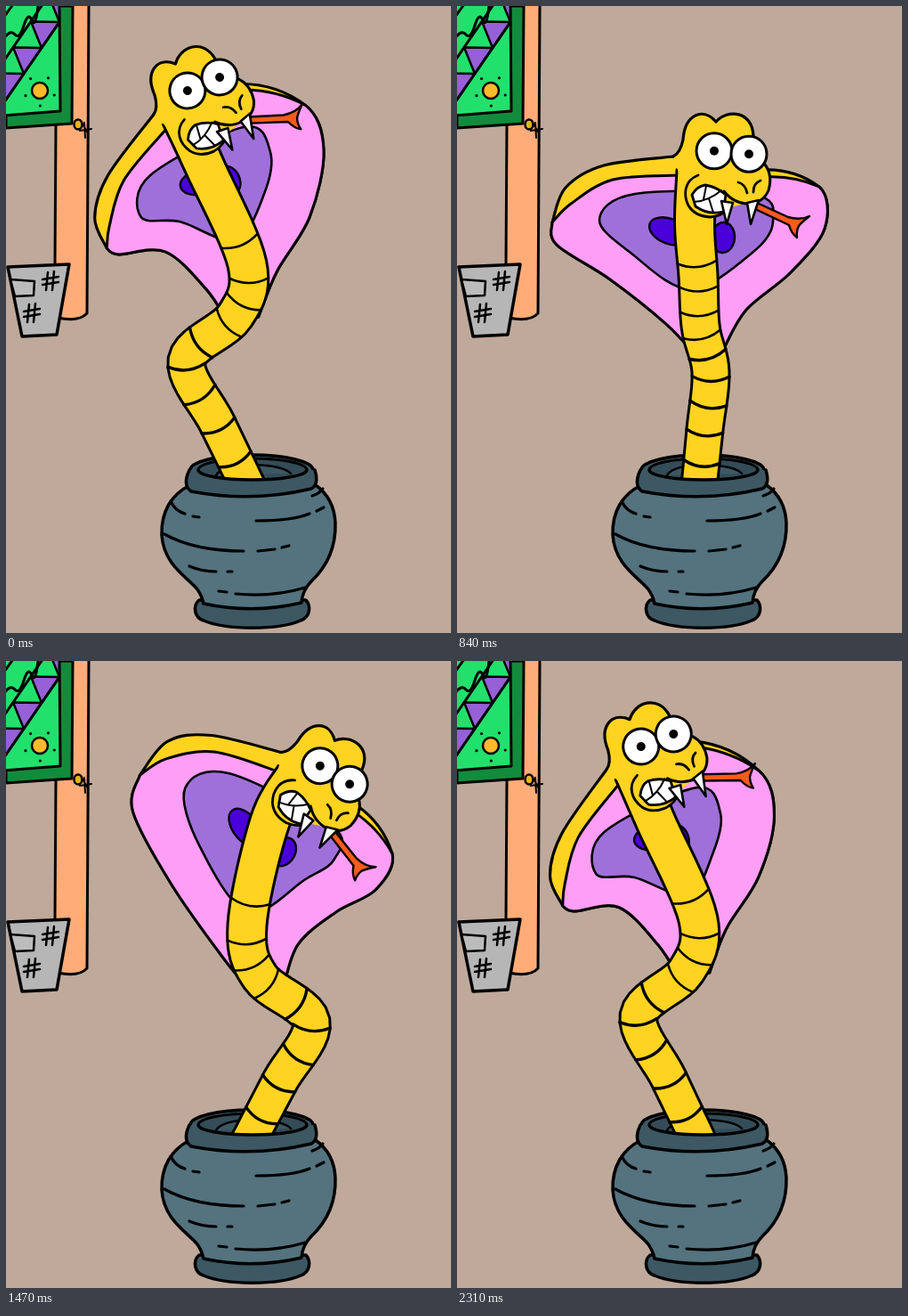
An HTML page with a canvas for the animation above (2380 ms loop, 500x704 px).

```html
<!DOCTYPE html>
<html lang="en">
<head>
<meta charset="utf-8">
<title>Dancing cobra</title>
<style>
html, body { margin: 0; width: 100%; height: 100%; overflow: hidden; background: #bfa99b; }
canvas { display: block; }
</style>
</head>
<body>
<canvas id="stage" width="500" height="704"></canvas>
<script>
const ctx = document.getElementById('stage').getContext('2d');
const LOOP = 2380, STEP = 70;
const YELLOW = '#ffd320', PINK = '#ff9ef5', PURPLE = '#9f70d9', INDIGO = '#4a00d9';
const POT = '#54737f', RIM = '#3d5863', HOLE = '#344c57';

// Key poses: head position, tilt and hood droop in degrees, sideways place of the bend
const pose = (time, x, y, tilt, droop, bend) => ({ time, x, y, tilt, droop, bend });
const DANCE = [
  pose(0, 222, 87.5, -22.5, 15, 203),
  pose(560, 216, 87, -29, 3, 205),
  pose(840, 308.5, 164.5, 5, 0, 285),
  pose(1260, 368.5, 136, 28, 5, 338),
  pose(1750, 370, 122.5, 34, 3, 346),
  pose(2030, 299.5, 184, 6, -5, 269),
  pose(2310, 225, 89, -21, 18, 204)
];

// Artwork is drawn in the upright pose; the rig bends it
const REST = DANCE[2], HINGE = [268, 190];
const hood = {
  left: [[165, 179], [122, 204], [107, 243]],
  bottom: [[112, 268], [172, 307], [235, 357], [266, 390]],
  right: [[300, 384], [325, 341], [375, 299], [413, 250], [407, 203]],
  fold: [[175, 195], [128, 222]],
  patch: [[200, 211], [160, 240], [195, 277], [262, 318], [333, 276], [355, 242], [335, 212]]
};
const art = {
  skull: 'M243 169Q251 165 254 150C256 122 276 113 291 130C304 115 332 118 333 146L346 178Q355 190 350 207Q344 221 328 221L302 227Q296 237 278 236Q256 232 257 212L250 190Z',
  crown: 'M243 169Q251 165 254 150C256 122 276 113 291 130C304 115 332 118 333 146',
  snout: 'M346 178Q355 190 350 207Q344 221 328 222Q311 222 300 208',
  lip: 'M271 190C255 196 254 212 260 224Q267 236 284 237Q297 236 303 229',
  teeth: 'M264 212Q270 202 279 201Q292 203 302 212L299 231Q282 235 268 225Z',
  gaps: 'M266 220Q283 219 297 207M280 202L277 217M283 216L288 232',
  fangs: 'M297 219L303 245L310 221ZM326 221L330 245L339 218Z',
  nostrils: 'M316 198Q324 200 326 210M341 196Q333 199 333 209',
  tongue: 'M337 221L372 237Q386 241 396 236Q387 243 384 247Q381 253 382 260Q376 256 373 246L335 228Z'
};
for (const k in art) art[k] = new Path2D(art[k]);

const rad = deg => deg * Math.PI / 180;
const mix = (a, b, k) => a + (b - a) * k;
const slope = (a, b) => a * b <= 0 ? 0 : 2 * a * b / (a + b);

// Monotone cubic between poses, wrapping around the loop
function poseAt(t) {
  const n = DANCE.length, i = DANCE.findLastIndex(p => p.time <= t);
  const key = k => DANCE[(k + n) % n];
  const time = k => key(k).time + Math.floor(k / n) * LOOP;
  const rate = (k, c) => (key(k + 1)[c] - key(k)[c]) / (time(k + 1) - time(k));
  const h = time(i + 1) - time(i), u = (t - time(i)) / h, v = 1 - u;
  const out = {};
  for (const c in REST) {
    const d = rate(i, c);
    const m0 = slope(rate(i - 1, c), d), m1 = slope(d, rate(i + 1, c));
    out[c] = mix(key(i)[c], key(i + 1)[c], u * u * (3 - 2 * u)) + h * u * v * (m0 * v - m1 * u);
  }
  return out;
}

function spin([x, y], [cx, cy], angle, [tx, ty] = [cx, cy]) {
  const cos = Math.cos(angle), sin = Math.sin(angle), dx = x - cx, dy = y - cy;
  return [tx + dx * cos - dy * sin, ty + dx * sin + dy * cos];
}

// Append a Catmull-Rom curve; prev and next steer its ends
function curve(path, pts, next, prev) {
  for (let i = 0; i < pts.length - 1; i++) {
    const b = pts[i], c = pts[i + 1];
    const a = pts[i - 1] || prev || b, d = pts[i + 2] || next || c;
    path.bezierCurveTo(b[0] + (c[0] - a[0]) / 6, b[1] + (c[1] - a[1]) / 6,
      c[0] - (d[0] - b[0]) / 6, c[1] - (d[1] - b[1]) / 6, ...c);
  }
}

function pathFrom(p) {
  const path = new Path2D();
  path.moveTo(...p);
  return path;
}

// Point on the Catmull-Rom curve through pts, u counted in points
function along(pts, u) {
  const i = Math.min(Math.floor(u), pts.length - 2), f = u - i;
  const b = pts[i], c = pts[i + 1], a = pts[i - 1] || b, d = pts[i + 2] || c;
  return [0, 1].map(k => b[k] + f / 2 * (c[k] - a[k] + f * (2 * a[k] - 5 * b[k] + 4 * c[k] - d[k]
    + f * (3 * (b[k] - c[k]) + d[k] - a[k]))));
}

function paint(path, fill, width = 3) {
  if (typeof path === 'string') path = new Path2D(path);
  if (fill) { ctx.fillStyle = fill; ctx.fill(path); }
  if (width) { ctx.lineWidth = width; ctx.stroke(path); }
}

function oval(x, y, rx, ry, fill, width = 3, turn = 0) {
  const p = new Path2D();
  p.ellipse(x, y, rx, ry, turn, 0, 7);
  paint(p, fill, width);
}

function drawWall() {
  ctx.fillStyle = '#bfa99b';
  ctx.fillRect(0, 0, 500, 704);
  paint('M74 0H92V344Q84 355 60 350L55 290V130H74Z', '#ffac78', 0);
  paint('M93 0L91 345Q82 355 58 350M56 134L55 290');
  paint('M0 0H75L74 132L0 137Z', '#128b3c');
  ctx.save();
  const cloth = new Path2D('M-4 -4H60L61 118L-4 123Z');
  ctx.clip(cloth);
  ctx.fillStyle = '#22e06c';
  ctx.fillRect(0, 0, 70, 130);
  const low = x => 105 - x * 1.45, side = 20;
  for (let x = -side; x < 90; x += side)
    paint(`M${x} ${low(x)}L${x + side} ${low(x + side)}L${x + side / 2 - 22} ${low(x + side / 2) - 15}Z`, '#9660d6', 2.5);
  paint('M-4 64L44 -6M-4 111L80 -11M-2 12L8 -2');
  paint('M-2 36Q5 26 10 32T20 22T29 16T36 0');
  oval(38, 95, 9, 9, '#fcba2b', 2.5);
  for (let a = 0.3; a < 6; a += 1.25)
    oval(38 + 17 * Math.cos(a), 95 + 17 * Math.sin(a), 1.6, 1.6, '#000', 0);
  ctx.restore();
  paint(cloth);
  oval(81, 133, 4.5, 5.5, '#e8b21d', 2.5);
  paint('M84 129L92 143M83 140L96 138M88 131L89 148', null, 2);
  paint('M2 293L71 290L57 369L18 371Z', '#b6b6b6', 3.5);
  paint('M5 307L32 309L31 325L10 326Z', '#bcbcbc', 2.5);
  for (const [x, y] of [[50, 309], [29, 345]]) {
    ctx.save();
    ctx.translate(x, y);
    paint('M-3 -10L-5 10M4 -11L2 10M-9 -2L9 -5M-9 4L9 1', null, 2.5);
    ctx.restore();
  }
}

function drawPot() {
  paint('M217 667C209 674 212 687 222 690C248 701 306 701 331 690C342 686 343 674 337 667Z', RIM, 3.5);
  paint('M207 538C186 548 174 568 175 594C177 628 205 642 215 655Q220 662 222 671Q277 683 332 670Q333 656 343 646C360 630 371 610 370 580C369 560 359 546 348 538Z', POT, 3.5);
  paint('M185 556Q190 567 201 570M210 573L217 574M178 593Q212 612 267 612M283 612L302 610M310 608L318 606'
    + 'M281 578Q322 578 341 570M349 567L357 563M206 629Q220 635 236 635M249 635L254 635'
    + 'M239 657L248 658M258 660Q300 664 336 653M344 550Q353 547 356 542', null, 3.2);
  oval(276, 521, 69, 17, RIM, 3.5);
  oval(277, 521, 61, 13, HOLE);
  paint('M236 527Q242 516 277 515Q312 516 320 525', RIM, 2.5);
}

function drawRim() {
  paint('M206 521L216 521A61 11 0 0 0 338 521L347 521Q352 537 343 542Q276 558 208 545Q198 538 206 521Z', RIM, 0);
  paint('M216 521A61 11 0 0 0 338 521M206 521Q198 538 208 545Q276 558 343 542Q352 537 347 521', null, 3.5);
}

// Head points move rigidly; hood points fade from the head's motion to the neck's
function makeRig(p) {
  const nose = [REST.x, REST.y], turn = rad(p.tilt - REST.tilt);
  const onHead = q => spin(q, nose, turn, [p.x, p.y]);
  const neckX = (p.bend - REST.bend) * 0.2, neckY = (p.y - REST.y) * 0.45;
  const skin = q => {
    const droop = rad(q[0] < HINGE[0] ? -p.droop : p.droop);
    const [x, y] = onHead(spin(q, HINGE, droop));
    const u = Math.min(1, Math.max(0, (q[1] - 215) / 175)), w = u * u * (3 - 2 * u);
    return [mix(x, q[0] + neckX, w), mix(y, q[1] + neckY, w)];
  };
  const sag = (p.y - 87.5) * 0.17, base = [272, 540], chest = [271, 290 + sag];
  const bend = [p.bend, 398 + sag];
  const hip = [mix(chest[0], bend[0], 0.2), bend[1] - 50];
  const shin = [mix(bend[0], base[0], 0.5), mix(bend[1], base[1], 0.5)];
  const spine = [onHead([270, 185]), onHead([267, 245]), chest, hip, bend, shin, base];
  return { nose, turn, onHead, skin, spine };
}

function drawHood(p, { onHead, skin }) {
  const part = name => hood[name].map(skin);
  const left = [onHead([243, 169]), ...part('left')], corner = left.at(-1);
  const bottom = [corner, ...part('bottom')];
  const right = part('right'), tip = right.at(-1);
  const sheet = (edge, top, bulge) => {
    const path = pathFrom(edge[0]);
    curve(path, edge);
    curve(path, bottom);
    path.lineTo(...right[0]);
    curve(path, right, top);
    path.quadraticCurveTo((tip[0] + top[0]) / 2 + (tip[1] - top[1]) * bulge,
      (tip[1] + top[1]) / 2 - (tip[0] - top[0]) * bulge, ...top);
    return path;
  };
  paint(sheet(left, onHead([346, 184]), 0.17), YELLOW, 3.2);
  paint(sheet([onHead([248, 190]), ...part('fold'), corner], onHead([347, 192]), 0.12), PINK);

  const patch = part('patch'), shape = pathFrom(patch[0]);
  curve(shape, [...patch, patch[0]], patch[1], patch.at(-1));
  paint(shape, PURPLE, 2.6);
  oval(...skin([239, 253]), 24, 14, INDIGO, 2.4, rad(p.tilt * 1.2 + 15));
  oval(...skin([299, 260]), 13, 17, INDIGO, 2.4, rad(p.tilt));
}

function drawBody({ spine }) {
  const end = spine.length - 1;
  // Point at u, moved sideways by a share of the half width and down the body
  const on = (u, across, down = 0) => {
    const [x, y] = along(spine, u), [x0, y0] = along(spine, Math.max(0, u - 0.01));
    const [x1, y1] = along(spine, Math.min(end, u + 0.01));
    const len = Math.hypot(x1 - x0, y1 - y0), dx = (x1 - x0) / len, dy = (y1 - y0) / len;
    const half = (23 - u * 0.5) * across;
    return [x + dy * half + dx * down, y - dx * half + dy * down];
  };
  const edge = across => Array.from({ length: 61 }, (_, i) => on(i / 60 * end, across));
  const trace = pts => {
    const path = pathFrom(pts[0]);
    for (const q of pts) path.lineTo(...q);
    return path;
  };
  const sides = [edge(-1), edge(1)];
  paint(trace([...sides[0], ...sides[1].reverse()]), YELLOW, 0);
  for (const s of sides) paint(trace(s));
  for (let i = 0; i < 9; i++) {
    const u = 1.75 + i * 0.47, band = pathFrom(on(u, -1, -1));
    band.quadraticCurveTo(...on(u, 0, 10), ...on(u, 1, -1));
    paint(band, null, i < 4 ? 2.6 : 3.4);
  }
}

function drawHead(p, { nose, turn }) {
  ctx.save();
  ctx.translate(p.x, p.y);
  ctx.rotate(turn);
  ctx.translate(-nose[0], -nose[1]);
  paint(art.tongue, '#fa5a1c', 2.4);
  paint(art.skull, YELLOW, 0);
  paint(art.crown, null, 3.2);
  paint(art.lip, null, 2.8);
  paint(art.teeth, '#fff', 2.8);
  paint(art.gaps, null, 2);
  paint(art.snout);
  paint(art.fangs, '#fff', 2.6);
  paint(art.nostrils, null, 2.8);
  for (const x of [-19.5, 19.5]) {
    const ex = nose[0] + x, ey = nose[1] + x * 0.0875;
    oval(ex, ey, 20, 20, '#fff');
    oval(ex, ey, 5, 5, '#000', 0);
  }
  ctx.restore();
}

const start = performance.now();

function frame() {
  const now = performance.now() - start;
  const p = poseAt(Math.floor(now % LOOP / STEP) * STEP), rig = makeRig(p);
  drawWall();
  drawPot();
  drawHood(p, rig);
  drawBody(rig);
  drawHead(p, rig);
  drawRim();
  requestAnimationFrame(frame);
}

ctx.lineJoin = ctx.lineCap = 'round';
frame();
</script>
</body>
</html>
```
